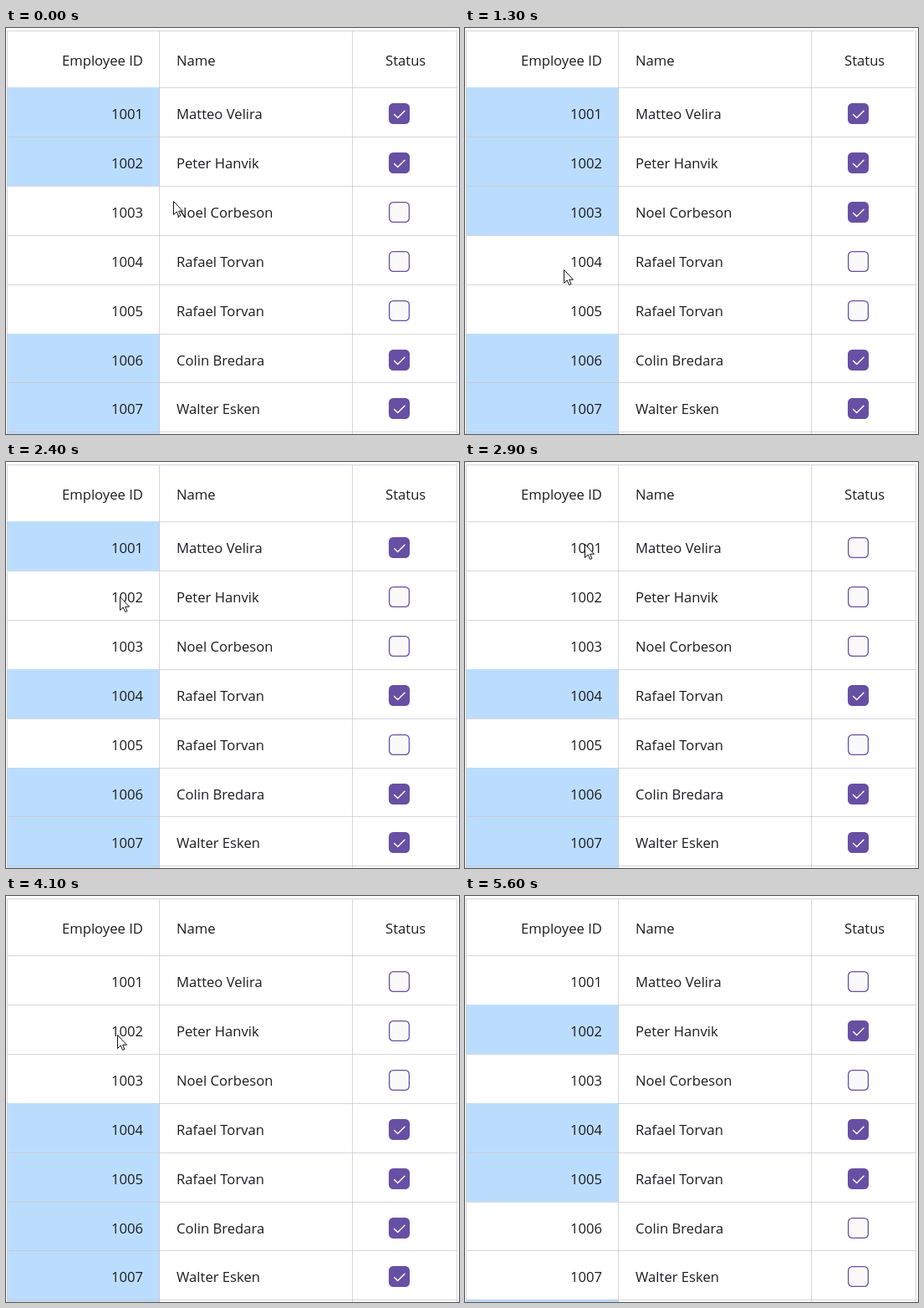
Recreate the animation shown at these times as an HTML page. Size 542 by 486 pixels, loop 6.2 s.

```html
<!DOCTYPE html>
<html lang="en">
<head>
<meta charset="utf-8">
<title>Employee status grid</title>
<style>
  html, body { margin: 0; width: 100%; height: 100%; overflow: hidden; background: #fff; }
  svg { display: block; }
  text { font: 16.65px "Open Sans", "Noto Sans", sans-serif; fill: #1c1b1f; }
  .line { fill: #cac4d0; fill-opacity: .7; }
  .selected { fill: #bbddfd; }
  .box { stroke: #6750a4; stroke-width: 1.3; }
  .tick { fill: none; stroke: #fff; stroke-width: 1.4; stroke-linecap: round; }
</style>
</head>
<body>
<svg id="stage" width="542" height="486" viewBox="0 0 542 486"></svg>
<script>
const LOOP = 6200, STEP = 100, TICK_TIME = 200, POINTER_GONE = 5600;
const stage = document.getElementById('stage');

const names = ['Matteo Velira', 'Peter Hanvik', 'Noel Corbeson', 'Rafael Torvan',
  'Rafael Torvan', 'Colin Bredara', 'Walter Esken'];
const rows = names.map(name => ({ name, initial: false, toggles: [] }));
for (const id of [1, 2, 6, 7]) rows[id - 1].initial = true;

const rowTop = i => 71 + Math.floor(58.9 * i + .5);
const rowMid = i => Math.floor(102.8 + 58.85 * i) + .5;

// The pointer glides between stops; a click is a stop that also toggles a row.
const stops = [];
const glide = (time, x, y) => stops.push({ time, x, y });
function click(time, id, x, dy) {
  rows[id - 1].toggles.push(time);
  glide(time, x, rowMid(id - 1) + dy);
}
glide(0, 200, 207);
glide(200, 459, 102);
glide(400, 456, 372);
click(800, 3, 133, -1);
glide(1200, 122, 330);
click(1400, 4, 118, 4);
click(2000, 3, 125, -6);
glide(2200, 136, 161);
click(2400, 2, 136, 0);
click(2900, 1, 143, -4);
glide(3400, 112, 349);
click(3600, 5, 112, 12);
click(4200, 2, 134, 4);
glide(4400, 132, 113);
glide(4800, 124, 479);
click(4900, 7, 124, -20);
click(5400, 6, 130, -14);
glide(5500, 150, 174);

function add(tag, attrs, text) {
  const el = document.createElementNS('http://www.w3.org/2000/svg', tag);
  for (const key in attrs) el.setAttribute(key, attrs[key]);
  if (text) el.textContent = text;
  return stage.appendChild(el);
}
const rect = (x, y, width, height, cls) => add('rect', { x, y, width, height, class: cls });
const label = (x, y, text, anchor = 'start') => add('text', { x, y, 'text-anchor': anchor }, text);
const show = (el, on) => el.setAttribute('visibility', on ? 'visible' : 'hidden');

rows.forEach((row, i) => {
  row.fill = rect(1, rowTop(i), 183, rowTop(i + 1) - rowTop(i), 'selected');
});
rect(1, rowTop(rows.length), 183, 3, 'selected');

rect(1, 3, 539, 1, 'line');
for (let i = 0; i <= rows.length; i++) {
  const idLine = rect(2, rowTop(i), 181, 1, 'line');
  if (rows[i]) rows[i].line = idLine;
  rect(183, rowTop(i), 357, 1, 'line');
}
for (const x of [1, 183, 414, 539]) rect(x, 4, 1, 482, 'line');

label(164, 45, 'Employee ID', 'end');
label(204, 45, 'Name');
label(454, 45, 'Status');

rows.forEach((row, i) => {
  const mid = rowMid(i);
  label(164, mid + 6.5, String(1001 + i), 'end');
  label(204, mid + 6.5, row.name);
  row.box = add('rect', { x: 458.6, y: mid - 11.9, width: 23.8, height: 23.8, rx: 4.8, class: 'box' });
  row.tick = add('path', { d: `M464.5 ${mid + .9}l4.2 4.2 8.3 -8.4`, pathLength: 1, class: 'tick' });
});

const pointer = add('path', {
  d: 'M.5 .5V16.5L4.2 13 6.7 18.5 9 17.5 6.6 12.2H11.5Z',
  fill: '#fff', stroke: '#111', 'stroke-width': 1,
});

const easeOut = k => 1 - (1 - k) ** 3;

function pointerAt(t) {
  const next = stops.find(s => s.time > t);
  const from = stops.filter(s => s.time <= t).pop();
  const to = next || from;
  const k = next ? easeOut((t - from.time) / (to.time - from.time)) : 1;
  return ['x', 'y'].map(axis => Math.floor(from[axis] + (to[axis] - from[axis]) * k));
}

function draw(t) {
  let aboveOn = false;
  for (const row of rows) {
    const past = row.toggles.filter(time => time <= t);
    const on = row.initial !== (past.length % 2 === 1);
    const age = past.length ? t - past[past.length - 1] : LOOP;
    show(row.fill, on);
    show(row.tick, on);
    // The first cell of a selected run covers its upper border.
    show(row.line, !on || aboveOn);
    row.box.setAttribute('fill', on ? '#6750a4' : '#f9f9fa');
    row.tick.setAttribute('stroke-dasharray', `${Math.min(1, .02 + age / TICK_TIME)} 2`);
    aboveOn = on;
  }
  show(pointer, t < POINTER_GONE);
  pointer.setAttribute('transform', `translate(${pointerAt(t)})`);
}

const start = performance.now();
function frame() {
  const t = (performance.now() - start) % LOOP;
  draw(Math.floor(t / STEP) * STEP);
  requestAnimationFrame(frame);
}
frame();
</script>
</body>
</html>
```
